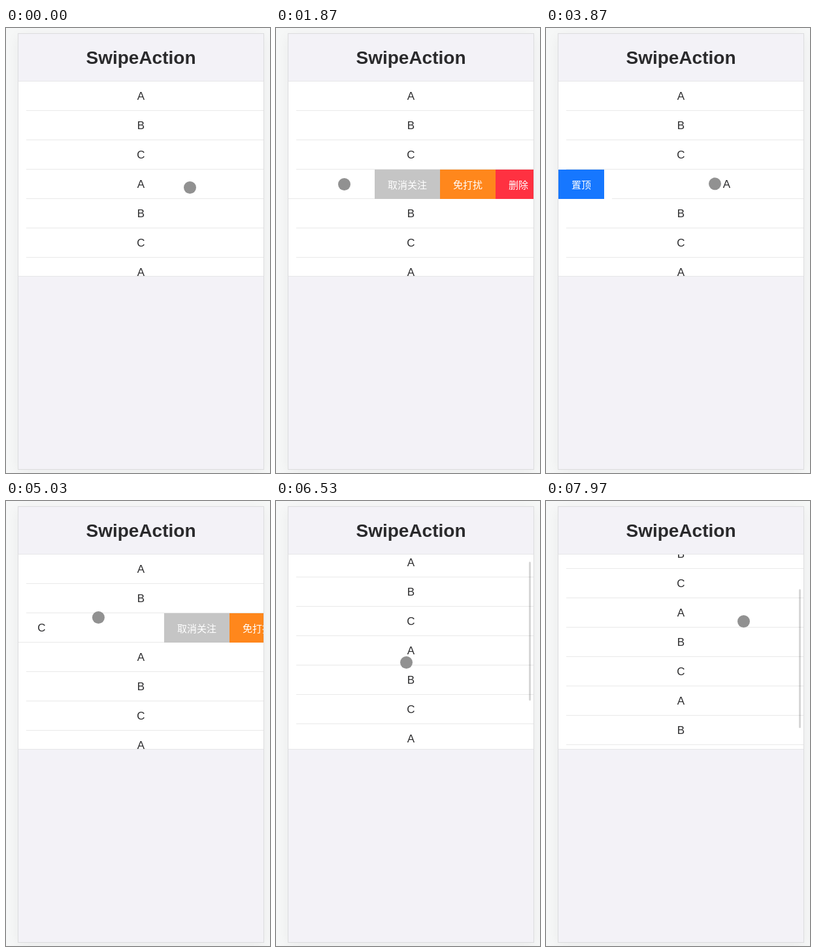
Animation, 404 px wide and 682 px high, one loop 8 s. Source, as an HTML page:

```html
<!DOCTYPE html>
<html lang="zh">
<head>
<meta charset="utf-8">
<title>SwipeAction</title>
<style>
  html, body { margin: 0; width: 100%; height: 100%; overflow: hidden; }
  body { position: relative; background: #f6f7f7; color: #2a2a2c; font-family: "Liberation Sans", sans-serif; }
  .card { position: absolute; left: 18px; top: 8px; width: 375px; height: 667px; background: #f3f2f7;
    border: 1px solid #dcdcde; box-shadow: 0 4px 18px rgba(0, 0, 0, .05); }
  h1 { margin: 0; height: 72px; font: bold 28px/73px "Liberation Sans", sans-serif; text-align: center; }
  .list { position: relative; height: 298px; overflow: hidden; background: #fff;
    border: solid #e6e6e8; border-width: 1px 0; }
  .row { position: relative; height: 45px; font-size: 17px; line-height: 45px; text-align: center; }
  .row::after { content: ""; position: absolute; left: 12px; right: 0; bottom: 0; height: 1px; background: #e9e9e9; }
  .actions { position: absolute; top: 0; display: flex; white-space: nowrap; color: #fff;
    font: 15px/45px "Noto Sans CJK SC", "Noto Sans CJK", sans-serif; }
  .actions span { height: 45px; padding: 0 20px; }
  .before { right: 100%; }
  .after { left: 100%; }
  .bar { position: absolute; left: 368px; top: 4px; width: 3px; height: 213px; border-radius: 2px; background: rgba(0, 0, 0, .16); }
  .touch { position: absolute; left: -9.5px; top: -9.5px; width: 19px; height: 19px; border-radius: 50%; background: #919191; }
</style>
</head>
<body>
<div class="card">
  <h1>SwipeAction</h1>
  <div class="list"><div id="rows"></div><div class="bar" id="bar"></div></div>
</div>
<div class="touch" id="touch"></div>
<script>
const LOOP = 8000, ROWS = 9, SCROLL_RATIO = 290 / 405;
const SCROLL_START = 6400, SCROLL_DISTANCE = 92, SCROLL_DECAY = 1160;
const CLOSED = 0, OPEN = -255, PINNED = 70;
const $ = id => document.getElementById(id);

const button = (text, color) => `<span style="background:${color}">${text}</span>`;
const before = button('置顶', '#1677ff');
const after = button('取消关注', '#c5c5c5') + button('免打扰', '#ff871c') + button('删除', '#ff3141');
$('rows').innerHTML = Array.from({ length: ROWS }, (_, i) =>
  `<div class="row"><div class="actions before">${before}</div>${'ABC'[i % 3]}<div class="actions after">${after}</div></div>`
).join('');
const rows = $('rows').children;

// The finger's stops; rows follow it while it is pressed
const path = [
  { t: 130, x: 281, y: 244 }, { t: 440, x: 110, y: 239 },
  { t: 780, x: 272, y: 239 }, { t: 1130, x: 272, y: 239 },
  { t: 1620, x: 104, y: 239 }, { t: 2410, x: 104, y: 239 },
  { t: 3250, x: 192, y: 239 }, { t: 3600, x: 258, y: 239 },
  { t: 4300, x: 258, y: 237 }, { t: 4650, x: 293, y: 178 },
  { t: 5110, x: 128, y: 178 }, { t: 5880, x: 90, y: 205 },
  { t: 6530, x: 199, y: 247 }, { t: 7470, x: 300, y: 187 }, { t: 7970, x: 302, y: 184 },
];
const drag = (row, press, release, rest) => ({ row, press, release, rest });
const tap = (row, time) => drag(row, time, time, CLOSED);
const gestures = [
  drag(3, 130, 780, CLOSED), drag(3, 1130, 1620, OPEN), tap(3, 2406),
  drag(3, 3250, 3600, PINNED), tap(3, 4300),
  drag(2, 4650, 5110, OPEN), tap(2, 5880),
];

const mix = (a, b, p) => a + (b - a) * p;
const smooth = p => p * p * (3 - 2 * p);
// Critically damped spring, by elapsed milliseconds
const spring = ms => 1 - (1 + ms * 0.014) * Math.exp(-ms * 0.014);

function touchAt(t) {
  const next = path.findIndex(stop => stop.t > t);
  if (next < 0) return path[path.length - 1];
  if (next === 0) return path[0];
  const a = path[next - 1], b = path[next];
  const p = smooth((t - a.t) / (b.t - a.t));
  return { x: mix(a.x, b.x, p), y: mix(a.y, b.y, p) };
}

function rowOffset(row, t) {
  const g = gestures.filter(g => g.row === row && g.press <= t).pop();
  if (!g) return CLOSED;
  const travel = touchAt(Math.min(t, g.release)).x - touchAt(g.press).x;
  const held = rowOffset(row, g.press - 1) + travel;
  return t <= g.release ? held : mix(held, g.rest, spring(t - g.release));
}

function draw(t) {
  for (let i = 0; i < ROWS; i++) {
    rows[i].style.transform = `translateX(${Math.round(rowOffset(i, t))}px)`;
  }
  const sinceScroll = Math.max(0, t - SCROLL_START);
  const scroll = Math.round(SCROLL_DISTANCE * (1 - Math.exp(-sinceScroll / SCROLL_DECAY)));
  $('rows').style.transform = `translateY(${-scroll}px)`;
  $('bar').style.transform = `translateY(${Math.round(scroll * SCROLL_RATIO)}px)`;
  $('bar').style.opacity = Math.min(1, sinceScroll / 100);
  const { x, y } = touchAt(t);
  $('touch').style.transform = `translate(${x}px, ${y}px)`;
}

const start = performance.now();
(function frame() {
  draw((performance.now() - start) % LOOP);
  requestAnimationFrame(frame);
})();
</script>
</body>
</html>
```
